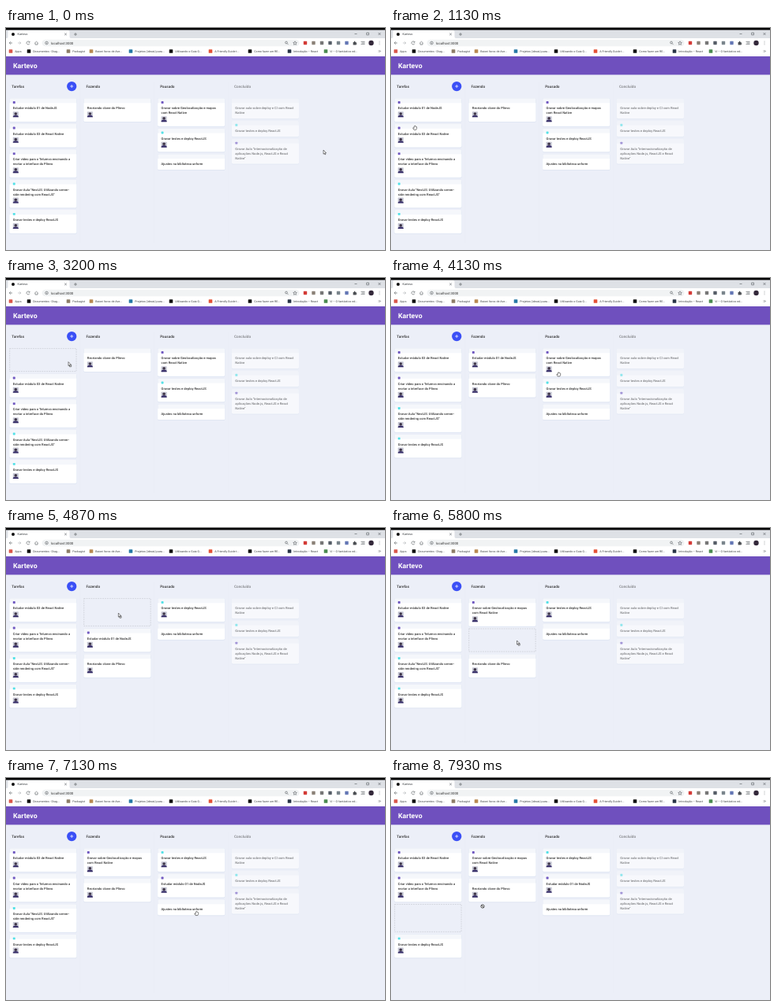
Write an HTML page that moves like this. It is 480x282 px and loops after 8 s.

```html
<!DOCTYPE html>
<html lang="pt-BR">
<head>
<meta charset="utf-8">
<title>Kartevo</title>
<style>
  html, body { margin: 0; width: 100%; height: 100%; overflow: hidden; background: #eceff8; }
  svg { display: block; width: 100vw; height: 100vh; }
  text { font-family: Roboto, sans-serif; text-rendering: geometricPrecision; white-space: pre; }
  .bookmarks text { font-size: 3.65px; fill: #3c4043; }
  .icon { fill: none; stroke: #5f6368; stroke-width: .65; }
  .board text { font-size: 14px; font-weight: 500; fill: #333; }
  .board .heading { font-size: 16px; }
  .card { filter: drop-shadow(0 1px 2px rgba(192, 208, 230, .8)); }
  .done { opacity: .6; }
  .slot { fill: none; stroke: rgba(0, 0, 0, .2); stroke-width: 2; stroke-dasharray: 6 4; }
  .pointer { fill: #fff; stroke: #222; stroke-width: .55; stroke-linejoin: round; }
</style>
</head>
<body>
<svg viewBox="0 0 480 282" preserveAspectRatio="none">
  <rect width="480" height="282" fill="#eceff8"/>

  <rect width="480" height="36" fill="#fff"/>
  <rect width="480" height="13" fill="#dee1e6"/>
  <rect width="480" height="2.5" fill="#000"/>
  <path d="M1 13q1.5 0 1.5-2V5q0-2 2-2H78.500q2 0 2 2v6q0 2 1.500 2z" fill="#fff"/>
  <circle cx="9" cy="8" r="2" fill="#111"/>
  <text x="14.500" y="9.300" font-size="3.800" fill="#3c4043">Kartevo</text>
  <path class="icon" d="M74.200 6.600l2.600 2.600m0-2.600l-2.600 2.600M86 8h4m-2-2v4"/>
  <path class="icon" d="M441.500 7.500h3M456.700 6h2.800v2.800h-2.800zM471.500 6l3 3m0-3l-3 3"/>

  <path class="icon" d="M8 19H4.200m1.800-1.800L4.200 19 6 20.800"/>
  <path class="icon" d="M15 19h3.800m-1.800-1.800l1.800 1.800-1.800 1.800" opacity=".45"/>
  <path class="icon" d="M29.600 17.700a2 2 0 1 0 .3 2M30 16.800v1.400h-1.500"/>
  <path class="icon" d="M36.300 19.200l2.200-2 2.200 2M37 18.800v2.300h3v-2.300"/>
  <rect x="45.500" y="14.800" width="326" height="8.400" rx="4.200" fill="#f1f3f4"/>
  <circle class="icon" cx="51.500" cy="19" r="1.800"/>
  <path class="icon" d="M51.500 18.800v1.200m0-2.200v.4"/>
  <text x="57" y="20.500" font-size="4.300" fill="#333">localhost:3000</text>
  <circle class="icon" cx="355" cy="18.500" r="1.400"/>
  <path class="icon" d="M356 19.500l1.600 1.600M366 16.800l.7 1.500 1.600.2-1.200 1.100.3 1.700-1.400-.8-1.400.8.3-1.700-1.200-1.100 1.600-.2z"/>
  <g id="extensions"></g>
  <path d="M439.600 18h1.200v-1.200h1.500V18h1.300v1.500h.8v1h-.8v1h-4z" fill="#4a4d51"/>
  <path d="M449.500 17.500h5M450.500 19h4M449.500 20.500h5" class="icon"/>
  <circle cx="462.500" cy="19" r="3.200" fill="#33283a"/>
  <path d="M473 16.700v.8m0 1.100v.8m0 1.100v.8" class="icon"/>
  <g class="bookmarks" id="bookmarks"></g>
  <path class="icon" d="M471.800 28.300l1.100 1.200-1.100 1.200m1.500-2.400l1.100 1.200-1.100 1.200"/>

  <rect y="36" width="480" height="23.400" fill="#6f50be"/>
  <text x="9" y="50.600" font-size="8.750" font-weight="700" fill="#fff">Kartevo</text>

  <g class="board" id="board" transform="translate(0 59.400) scale(.293)"></g>
  <g id="cursor">
    <path class="pointer" data-kind="arrow" d="M-1.500-3v5.200l1.200-1.100.8 1.800.8-.4-.8-1.700h1.600z"/>
    <path class="pointer" data-kind="hand" d="M-1.100 2.500L-2.300.5q-.2-.9.800-.5l.5.5v-2.200q.5-.7.900 0v-.6q.5-.6.900 0v.5q.6-.5.900.2v.5q.6-.4.800.2V.8L1.700 2.500z"/>
    <g data-kind="drag">
      <path class="pointer" d="M-1.500-3v5l1.200-1 .8 1.700.8-.4-.8-1.600h1.600z"/>
      <path class="pointer" d="M0 1.200h2.200v1.900H0z"/>
    </g>
    <g data-kind="denied" fill="#fff" stroke="#222" stroke-width=".8">
      <circle r="2.100"/><path d="M-1.500-1.500l3 3"/>
    </g>
  </g>
</svg>
<script>
const LOOP = 8000, TICK = 1000 / 15;
const SCALE = .293, BOARD_TOP = 59.4;
const COLUMN = 320, CARD_WIDTH = 290, FIRST_CARD = 102, GAP = 10;
const PURPLE = '#7159c1', TEAL = '#54e1e7';
const byId = id => document.getElementById(id);

const bookmarks = [
  [6, '#d9574b', 'Apps'], [29, '#111', 'Documentos - Diag...'], [79, '#8d7d68', 'Packagist'],
  [108, '#b88952', 'Baixei livros de Ave...'], [158, '#2778a5', 'Projetos (ideais) para...'],
  [209, '#111', 'Utilizando o Guia G...'], [259, '#e45136', 'A Friendly Guide t...'],
  [309, '#111', 'Como fazer um RE...'], [359, '#283447', 'Introdução – React'],
  [405, '#4b8a50', 'Vi – O fantástico ed...']
];
byId('bookmarks').innerHTML = bookmarks.map(([x, color, name]) =>
  `<rect x="${x - 2.3}" y="27.200" width="4.600" height="4.600" rx=".6" fill="${color}"/>
   <text x="${x + 5.2}" y="30.900">${name}</text>`).join('');

const extensions = [[379, '#d33a36'], [389.5, '#8b8177'], [400, '#777'], [410.5, '#555c66'], [421, '#7a858c'], [431.5, '#6477b5']];
byId('extensions').innerHTML = extensions.map(([x, color]) =>
  `<rect x="${x - 2.2}" y="16.800" width="4.400" height="4.400" rx=".6" fill="${color}"/>`).join('');

const card = (label, avatar, ...lines) => ({
  label, avatar, lines, height: 48 + 20 * lines.length + (avatar ? 33 : 0)
});
const cards = {
  module1: card(PURPLE, true, 'Estudar módulo 01 de NodeJS'),
  module3: card(PURPLE, true, 'Estudar módulo 03 de React Native'),
  video: card(PURPLE, true, 'Criar vídeo para o Telumvo ensinando a', 'recriar a interface do Plinvo'),
  lesson: card(TEAL, true, 'Gravar Aula "NextJS: Utilizando server-', 'side rendering com ReactJS"'),
  tests: card(TEAL, true, 'Gravar testes e deploy ReactJS'),
  clone: card(null, true, 'Recriando clone do Plinvo'),
  maps: card(PURPLE, true, 'Gravar sobre Geolocalização e mapas', 'com React Native'),
  paused: card(TEAL, true, 'Gravar testes e deploy ReactJS'),
  library: card(null, false, 'Ajustes na biblioteca unform'),
  deploy: card(null, false, 'Gravar aula sobre deploy e CI com React', 'Native'),
  finished: card(TEAL, false, 'Gravar testes e deploy ReactJS'),
  i18n: card(PURPLE, false, 'Gravar Aula "Internacionalização de', 'aplicações Node.js, ReactJS e React', 'Native"')
};
const headings = ['Tarefas', 'Fazendo', 'Pausado', 'Concluído'];
const startColumns = [
  ['module1', 'module3', 'video', 'lesson', 'tests'],
  ['clone'],
  ['maps', 'paused', 'library'],
  ['deploy', 'finished', 'i18n']
];

// time, dragged card, then the column and index it moves to
const steps = [
  [3060, 'module1'], [3330, 'module1', 1, 0], [3530, null],
  [4660, 'maps'], [4790, 'maps', 1, 0], [4925, null],
  [5590, 'module1'], [5860, 'module1', 2, 1], [5865, null],
  [7660, 'lesson']
];

// time, x, y of the cursor's centre
const path = [
  [0, 403.5, 158], [660, 404, 158], [1130, 30, 127], [1470, 42, 112], [1530, 48, 108],
  [1850, 105, 74], [2130, 184, 92], [2400, 150, 114], [2530, 101, 117], [2800, 32, 114],
  [3000, 32, 112], [3330, 112, 108], [3600, 138, 113], [3800, 140, 113], [4130, 212, 122],
  [4350, 224, 147], [4600, 222, 114], [4670, 215, 112], [4800, 150, 110], [4930, 138, 112],
  [5070, 138, 114], [5560, 132, 141], [5730, 142, 144], [5800, 161, 146], [5870, 208, 140],
  [6200, 225, 128], [6400, 225, 128], [6750, 299, 152], [7130, 241.5, 172], [7200, 234, 173],
  [7270, 231, 173], [7600, 40, 178], [7670, 40, 178], [7930, 116, 163], [8000, 116, 163]
];

function boardAt(time) {
  const columns = startColumns.map(ids => [...ids]);
  let dragged = null;
  for (const [at, id, column, index] of steps) {
    if (at > time) break;
    dragged = id;
    if (column === undefined) continue;
    const from = columns.find(ids => ids.includes(id));
    from.splice(from.indexOf(id), 1);
    columns[column].splice(index, 0, id);
  }
  const placed = [];
  columns.forEach((ids, column) => {
    let y = FIRST_CARD;
    for (const id of ids) {
      placed.push({ id, column, x: column * COLUMN + 15 + (column ? 1 : 0), y, ...cards[id] });
      y += cards[id].height + GAP;
    }
  });
  return { placed, dragged };
}

function avatarMarkup(y) {
  return `<g transform="translate(15 ${y})"><rect width="24" height="24" rx="2" fill="#c3c4d2"/>
    <path d="M0 24v-4q4-5 12-5t12 5v4z" fill="#39306a"/><circle cx="12" cy="9" r="6" fill="#3f3648"/></g>`;
}

function cardMarkup({ id, column, x, y, label, avatar, lines, height }, dragged) {
  if (id === dragged) {
    return `<rect class="slot" x="${x + 1}" y="${y + 1}" width="${CARD_WIDTH - 2}" height="${height - 2}"/>`;
  }
  const text = lines.map((line, i) => `<text x="15" y="${48 + i * 20}">${line}</text>`).join('');
  return `<g class="${column === 3 ? 'done' : ''}" transform="translate(${x} ${y})">
    <g class="card"><rect width="${CARD_WIDTH}" height="${height}" rx="5" fill="#f5f7fb"/>
    <path d="M0 20h290v${height - 25}q0 5-5 5H5q-5 0-5-5z" fill="#fff"/></g>
    ${label ? `<rect x="15" y="13" width="10" height="10" rx="2" fill="${label}"/>` : ''}
    ${text}${avatar ? avatarMarkup(38 + 20 * lines.length) : ''}</g>`;
}

const frameMarkup = headings.map((name, i) =>
  `<text class="heading${i === 3 ? ' done' : ''}" x="${i * COLUMN + 25 + (i ? 1 : 0)}" y="55.500">${name}</text>` +
  (i ? `<path d="M${i * COLUMN + .5} 30V729" stroke="#000" stroke-opacity=".05"/>` : '')).join('') +
  '<circle cx="284" cy="50" r="21" fill="#3b50f6"/><path d="M277 50h14m-7-7v14" stroke="#fff" stroke-width="2.500"/>';

function cursorAt(time) {
  const i = Math.max(1, path.findIndex(([at]) => at > time));
  const [t0, x0, y0] = path[i - 1], [t1, x1, y1] = path[i];
  const p = (time - t0) / (t1 - t0);
  return [x0 + (x1 - x0) * p, y0 + (y1 - y0) * p];
}

function cursorKind(x, y, { placed, dragged }) {
  const bx = x / SCALE, by = (y - BOARD_TOP) / SCALE;
  const over = placed.some(c => bx >= c.x && bx <= c.x + CARD_WIDTH && by >= c.y && by <= c.y + c.height);
  if (dragged) return over ? 'drag' : 'denied';
  return over ? 'hand' : 'arrow';
}

const cursor = byId('cursor');
let shownStep = -1, board;

function draw(now) {
  const time = Math.floor((now % LOOP + 4) / TICK) * TICK % LOOP;
  const step = steps.filter(([at]) => at <= time).length;
  if (step !== shownStep) {
    shownStep = step;
    board = boardAt(time);
    byId('board').innerHTML = frameMarkup + board.placed.map(c => cardMarkup(c, board.dragged)).join('');
  }
  const [x, y] = cursorAt(time);
  const kind = cursorKind(x, y, board);
  cursor.setAttribute('transform', `translate(${x} ${y})`);
  for (const shape of cursor.children) shape.style.display = shape.dataset.kind === kind ? '' : 'none';
}

const start = performance.now();
function loop() {
  draw(performance.now() - start);
  requestAnimationFrame(loop);
}
loop();
</script>
</body>
</html>
```
